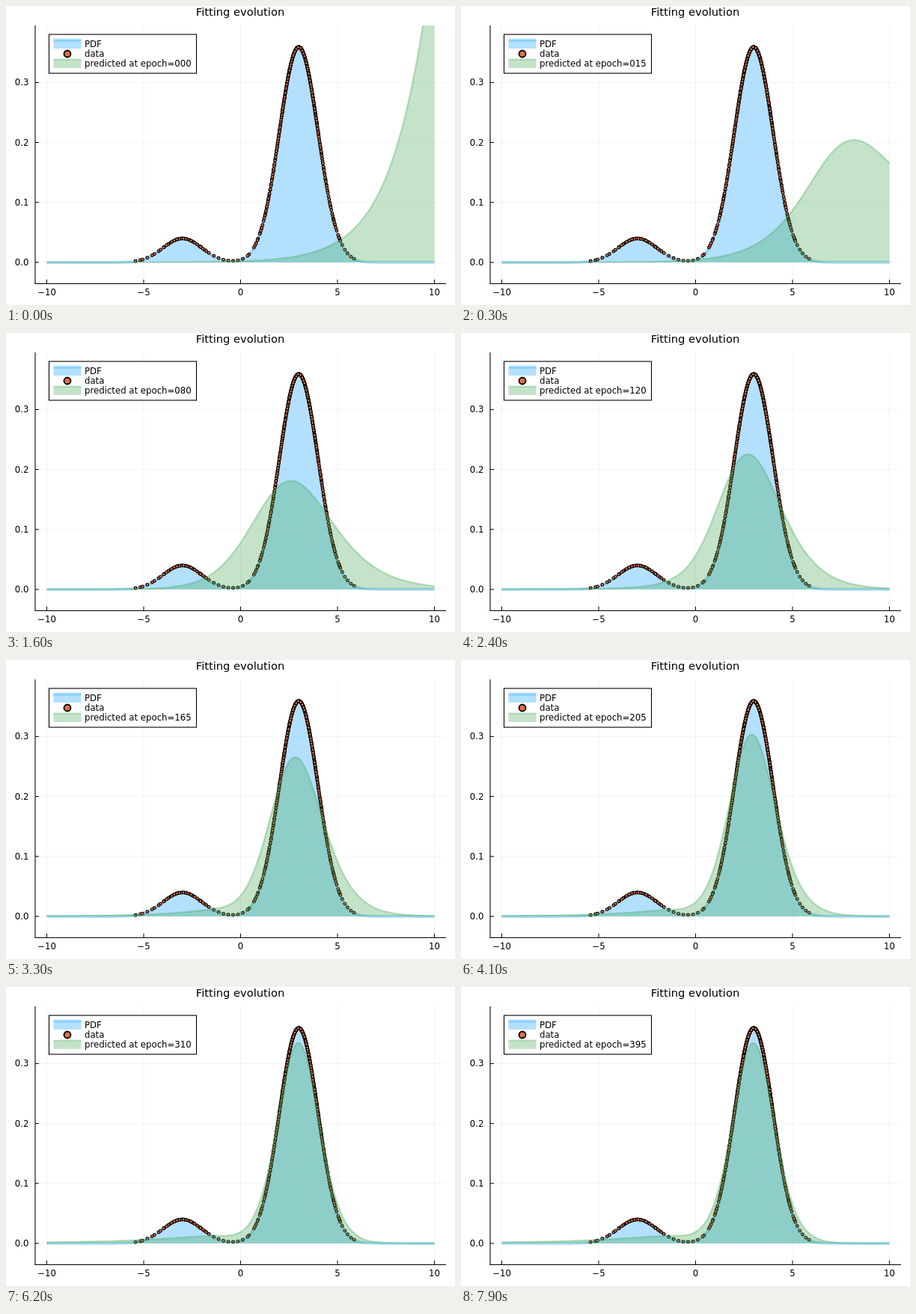
Write an HTML page with a canvas that moves like this. It is 600 px wide and 400 px high and loops after 8000 ms.

```html
<!DOCTYPE html>
<html lang="en">
<head>
<meta charset="utf-8">
<title>Fitting evolution</title>
<style>
html, body { margin: 0; width: 100%; height: 100%; overflow: hidden; background: #fff; }
canvas { display: block; width: 600px; height: 400px; }
</style>
</head>
<body>
<canvas id="stage" width="600" height="400"></canvas>
<script>
const ctx = document.getElementById('stage').getContext('2d');
const LOOP = 8000, STEP = 100, EPOCHS_PER_STEP = 5;
const BLUE = 'rgba(0,154,250,0.3)', GREEN = 'rgba(62,164,78,0.3)', ORANGE = '#e26f46';
const FONT = '"DejaVu Sans", sans-serif';

const px = x => 313.5 + 25.9 * x;
const py = y => 343 - 802 * y;
const bell = (x, m) => Math.exp(-(x - m) * (x - m) / 2) / Math.sqrt(2 * Math.PI);
const pdf = x => 0.1 * bell(x, -3) + 0.9 * bell(x, 3);
const xs = Array.from({ length: 261 }, (_, i) => -10 + i / 13);
const truth = xs.map(pdf);

// Skewed hump of height 1 at m: log slopes a (left) and -b (right), rounder for small k.
function hump(x, m, a, b, k) {
  const u = k * (x - m);
  return ((b * Math.exp(-a * u) + a * Math.exp(b * u)) / (a + b)) ** (-1 / k);
}

// Main hump at key epochs, and the share of the broad shoulder left of it.
const keys = [
  { epoch: 0, m: 13, a: 0.57, b: 0.3, k: 1, share: 0 },
  { epoch: 40, m: 2.55, a: 0.75, b: 0.255, k: 0.7, share: 0 },
  { epoch: 80, m: 2.6, a: 1.02, b: 0.65, k: 0.37, share: 0 },
  { epoch: 165, m: 2.82, a: 1.7, b: 1.1, k: 0.3, share: 0.033 },
  { epoch: 245, m: 2.95, a: 2, b: 1.7, k: 0.25, share: 0.029 },
  { epoch: 310, m: 2.98, a: 1.98, b: 1.95, k: 0.235, share: 0.035 }
];

// Monotone cubic interpolation of one key property, constant after the last key.
function at(epoch, name) {
  const X = keys.map(k => k.epoch), Y = keys.map(k => k[name]), last = X.length - 1;
  if (epoch >= X[last]) return Y[last];
  const sec = i => (Y[i + 1] - Y[i]) / (X[i + 1] - X[i]);
  const slope = i => {
    if (i === 0) return sec(0);
    if (i === last) return 0;
    const p = sec(i - 1), q = sec(i);
    return p * q > 0 ? 2 * p * q / (p + q) : 0;
  };
  const i = X.findIndex(x => x > epoch) - 1;
  const h = X[i + 1] - X[i], t = (epoch - X[i]) / h, s = 1 - t;
  return s * s * (1 + 2 * t) * Y[i] + t * t * (3 - 2 * t) * Y[i + 1] +
    h * t * s * (s * slope(i) - t * slope(i + 1));
}

// Density normalised to area 1 over the visible range.
function predict(epoch) {
  const [m, a, b, k, share] = ['m', 'a', 'b', 'k', 'share'].map(name => at(epoch, name));
  const flat = 0.4 - 0.15 * Math.min(1, Math.max(0, (epoch - 165) / 145));
  const ys = xs.map(x => hump(x, m, a, b, k) + share * hump(x, -1.7, flat, 1.4, 1));
  const area = ys.reduce((sum, y, i) => sum + (i % 260 ? y : y / 2), 0) / 13;
  return ys.map(y => y / area);
}

// Random walk whose steps shrink where the density is high, in shuffled order.
function makeData() {
  const pts = [];
  let seed = 11;
  const rand = () => (seed = seed * 16807 % 2147483647) / 2147483647;
  for (let x = -5.42; x < 6.1; x += Math.min(0.25, (0.1 + 1.8 * rand()) / (450 * pdf(x)))) {
    pts.splice(Math.floor(rand() * (pts.length + 1)), 0, x);
  }
  return pts;
}
const data = makeData();

function line(x1, y1, x2, y2, color, width) {
  ctx.strokeStyle = color;
  ctx.lineWidth = width;
  ctx.beginPath();
  ctx.moveTo(x1, y1);
  ctx.lineTo(x2, y2);
  ctx.stroke();
}

function text(str, x, y, align, size = 11.73) {
  ctx.font = size + 'px ' + FONT;
  ctx.textAlign = align;
  ctx.fillStyle = '#000';
  ctx.fillText(str, x, y);
}

function dot(x, y, r, width) {
  ctx.beginPath();
  ctx.arc(x, y, r, 0, 2 * Math.PI);
  ctx.fillStyle = ORANGE;
  ctx.fill();
  ctx.strokeStyle = '#000';
  ctx.lineWidth = width;
  ctx.stroke();
}

function ribbon(ys, color, width) {
  const trace = () => xs.forEach((x, i) => ctx.lineTo(px(x), py(ys[i])));
  ctx.save();
  ctx.beginPath();
  ctx.rect(39, 26, 549, 346);
  ctx.clip();
  ctx.fillStyle = ctx.strokeStyle = color;
  ctx.lineWidth = width;
  ctx.lineJoin = 'round';
  ctx.beginPath();
  ctx.moveTo(px(-10), py(0));
  trace();
  ctx.lineTo(px(10), py(0));
  ctx.fill();
  ctx.beginPath();
  trace();
  ctx.stroke();
  ctx.restore();
}

function axes() {
  const grid = 'rgba(0,0,0,0.05)';
  for (let x = -10; x <= 10; x += 5) {
    line(px(x), 26, px(x), 371, grid, 1);
    line(px(x), 371, px(x), 366, '#000', 1);
    text(String(x).replace('-', '\u2212'), px(x), 387, 'center');
  }
  for (let i = 0; i < 4; i++) {
    const y = py(i / 10);
    line(39, y, 588, y, grid, 1);
    line(39, y, 44, y, '#000', 1);
    text((i / 10).toFixed(1), 30.5, Math.round(y + 4), 'right');
  }
  line(39, 26, 39, 372, '#000', 1.1);
  line(38.5, 371.5, 588, 371.5, '#000', 1.1);
  text('Fitting evolution', 313, 13, 'center', 14.67);
}

function swatch(y, color, width) {
  ctx.fillStyle = color;
  ctx.fillRect(63.5, y, 37, 11.3);
  line(63.5, y, 100.5, y, color, width);
}

function legend(epoch) {
  ctx.fillStyle = '#fff';
  ctx.fillRect(57.5, 38, 197, 52);
  ctx.strokeStyle = '#000';
  ctx.lineWidth = 1.1;
  ctx.strokeRect(57.5, 38, 197, 52);
  swatch(45.6, BLUE, 4);
  dot(82, 64, 4.5, 1.8);
  swatch(71.6, GREEN, 2.4);
  text('PDF', 105, 55, 'left');
  text('data', 105, 68, 'left');
  text('predicted at epoch=' + String(epoch).padStart(3, '0'), 105, 81, 'left');
}

function draw(epoch) {
  ctx.fillStyle = '#fff';
  ctx.fillRect(0, 0, 600, 400);
  axes();
  ribbon(truth, BLUE, 4);
  data.forEach(x => dot(px(x), py(pdf(x)), 1.9, 1.1));
  ribbon(predict(epoch), GREEN, 2.4);
  legend(epoch);
}

let shown = -1;
function tick() {
  const epoch = Math.floor(performance.now() % LOOP / STEP) * EPOCHS_PER_STEP;
  if (epoch !== shown) draw(shown = epoch);
  requestAnimationFrame(tick);
}
tick();
</script>
</body>
</html>
```
